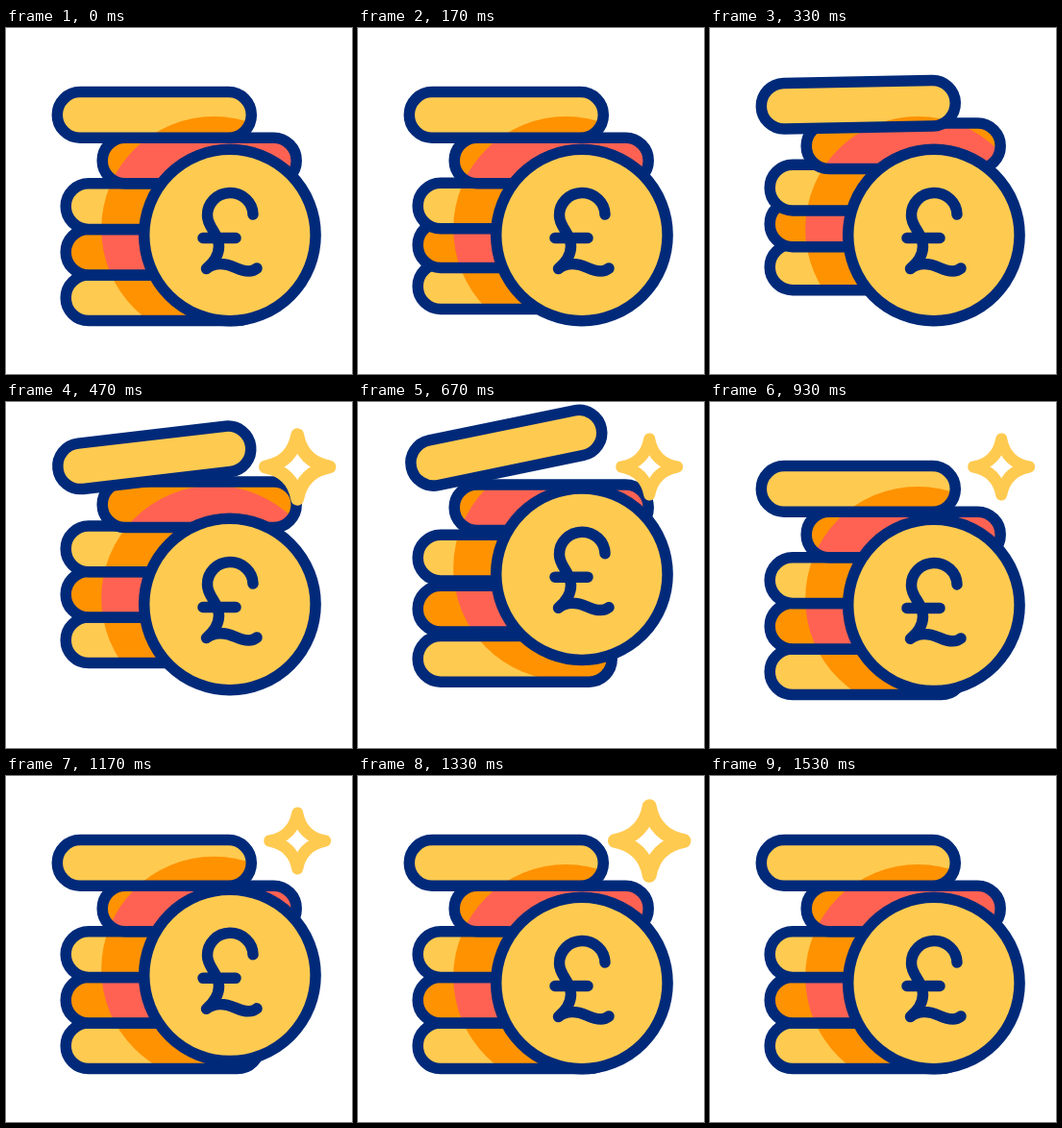
These frames come from a looping animation (360 by 360 pixels, 2 s). An HTML page with a canvas:

```html
<!DOCTYPE html>
<html lang="en">
<head>
<meta charset="utf-8">
<title>Pound coins</title>
<style>
  html, body { margin: 0; width: 100%; height: 100%; overflow: hidden; background: #fff; }
  canvas { display: block; width: 360px; height: 360px; }
</style>
</head>
<body>
<canvas id="stage"></canvas>
<script>
const LOOP = 2000, STEP = 1000 / 30;
const NAVY = '#002a79', YELLOW = '#ffca50', ORANGE = '#ff9200', RED = '#ff6252';
const canvas = document.getElementById('stage');
const ctx = canvas.getContext('2d');
const ratio = window.devicePixelRatio || 1;
canvas.width = canvas.height = 360 * ratio;

// Eased interpolation through [time, value] pairs
function track(t, keys) {
  if (t <= keys[0][0]) return keys[0][1];
  for (let i = 1; i < keys.length; i++) {
    const [t0, v0] = keys[i - 1], [t1, v1] = keys[i];
    if (t < t1) {
      const p = (t - t0) / (t1 - t0);
      return v0 + (v1 - v0) * p * p * (3 - 2 * p);
    }
  }
  return keys[keys.length - 1][1];
}

// Stacked coins from the bottom up; each one lifts and lands a little later
const stack = [
  { x: 163.2, y: 280.8, base: YELLOW, shade: ORANGE, rise: 25, fall: 515 },
  { x: 163.2, y: 233.2, base: ORANGE, shade: RED, rise: 60, fall: 540 },
  { x: 163.2, y: 185.6, base: YELLOW, shade: ORANGE, rise: 140, fall: 571 },
  { x: 201.2, y: 138, base: ORANGE, shade: RED, rise: 170, fall: 602 }
];
const topCoin = { x: 154.3, y: 90.4, base: YELLOW, shade: ORANGE };

const lift = (c, t) => track(t, [[c.rise, 0], [c.rise + 345, -33], [c.fall, -33], [c.fall + 270, 0]]);
const topLift = t => track(t, [[210, 0], [595, -44], [640, -44], [900, 0]]);
const topTilt = t => track(t, [[260, 0], [640, -11.8], [650, -11.8], [900, 0]]);
const coinLift = t => track(t, [[400, 0], [690, -37], [997, 0], [1135, -9], [1300, 0]]);
const starScale = t => track(t, [[333, 0], [500, 1.28], [633, 1], [1233, 1], [1367, 1.28], [1533, 0]]);

function barPath(coin, dy, tilt = 0) {
  const bar = new Path2D(), placed = new Path2D();
  bar.roundRect(-101, -23.8, 202, 47.6, 23.8);
  placed.addPath(bar, new DOMMatrix().translate(coin.x, coin.y + dy).rotate(tilt));
  return placed;
}

function disc(x, y, r) {
  const path = new Path2D();
  path.arc(x, y, r, 0, Math.PI * 2);
  return path;
}

function drawBar(coin, path, shadow) {
  ctx.fillStyle = coin.base;
  ctx.fill(path);
  ctx.save();
  ctx.clip(path);
  ctx.fillStyle = coin.shade;
  ctx.fill(shadow);
  ctx.restore();
  ctx.stroke(path);
}

const pound = new Path2D(
  'M257 194 A23.75 23 0 0 0 209.5 195 C209.5 208 221.5 213 221.5 227 ' +
  'C221.5 238 215 245 208.5 250.5 C219 242 231 246 239 249.5 S255 255 261 250 M205 218.5 H239');

const star = new Path2D(
  'M0 -29 Q4.5 -4.5 29 0 Q4.5 4.5 0 29 Q-4.5 4.5 -29 0 Q-4.5 -4.5 0 -29 Z');

function drawStar(scale) {
  if (scale <= 0.01) return;
  ctx.save();
  ctx.translate(303.2, 67.5);
  ctx.scale(scale, scale);
  ctx.lineWidth = 12;
  ctx.strokeStyle = YELLOW;
  ctx.stroke(star);
  ctx.restore();
}

function draw(t) {
  ctx.setTransform(ratio, 0, 0, ratio, 0, 0);
  ctx.fillStyle = '#fff';
  ctx.fillRect(0, 0, 360, 360);
  ctx.lineWidth = 11.5;
  ctx.lineCap = ctx.lineJoin = 'round';
  ctx.strokeStyle = NAVY;

  const dy = coinLift(t);
  const shadow = disc(216.2, 209 + dy, 117);
  for (const coin of stack) drawBar(coin, barPath(coin, lift(coin, t)), shadow);
  drawBar(topCoin, barPath(topCoin, topLift(t), topTilt(t)), shadow);

  const face = disc(232.9, 215.5 + dy, 89.2);
  ctx.fillStyle = YELLOW;
  ctx.fill(face);
  ctx.stroke(face);
  ctx.save();
  ctx.translate(0, dy);
  ctx.stroke(pound);
  ctx.restore();

  drawStar(starScale(t));
}

const start = performance.now();
function tick() {
  const t = (performance.now() - start) % LOOP;
  draw(Math.floor((t + 4) / STEP) * STEP % LOOP);
  requestAnimationFrame(tick);
}
tick();
</script>
</body>
</html>
```
